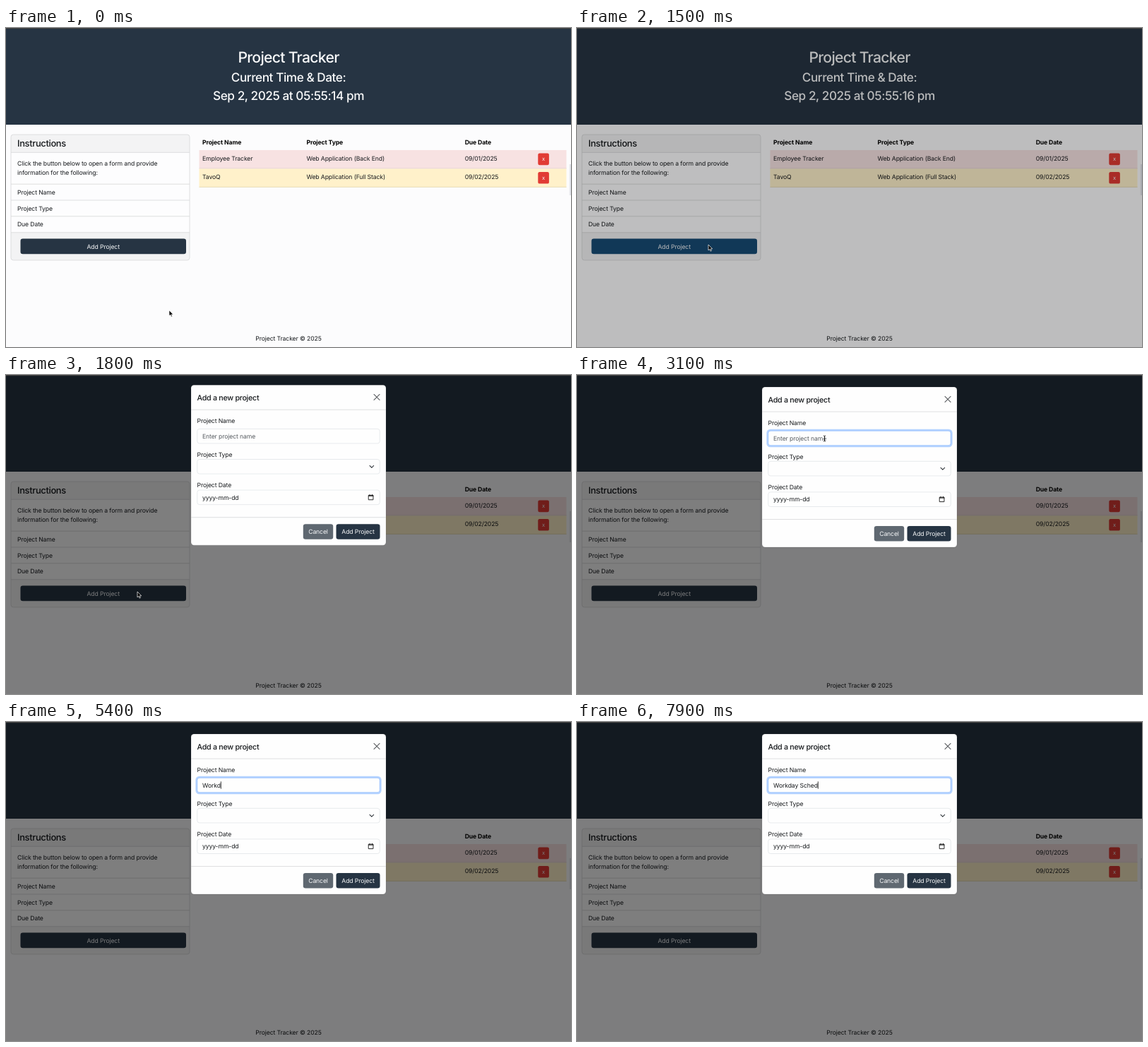
An HTML page that plays this animation: 800x452 px, repeating every 8000 ms.

```html
<!DOCTYPE html>
<html lang="en">
<head>
<meta charset="utf-8">
<title>Project Tracker</title>
<style>
  html, body { margin: 0; width: 100%; height: 100%; overflow: hidden; background: #fcfcfd; }
  svg { display: block; width: 800px; height: 452px; }
  text {
    font: 400 8.65px Inter, Roboto, sans-serif;
    font-optical-sizing: none;
    letter-spacing: -.013em;
    text-rendering: geometricPrecision;
    white-space: pre;
    fill: #16191c;
  }
  .mid { text-anchor: middle; }
  .bold { font-weight: 700; fill: #000; }
  .light, .btn { fill: #f8f9fa; }
  .h1, .h2, .h4, .h5 { font-weight: 500; letter-spacing: -.026em; }
  .h1 { font-size: 21.2px; letter-spacing: -.034em; }
  .h2 { font-size: 17.2px; }
  .h4 { font-size: 12.9px; }
  .h5 { font-size: 10.7px; }
  .hint { fill: #565b60; }
  .small { font-size: 7.6px; }
  .navy { fill: #263443; }
  .field { fill: #fefefe; stroke: #dee2e6; stroke-width: .7; }
  .line { stroke: #d6d7d9; stroke-width: .8; fill: none; }
  .icon { fill: none; stroke: #33383d; stroke-width: 1.1; stroke-linecap: round; stroke-linejoin: round; }
</style>
</head>
<body>
<svg viewBox="0 0 800 452">
  <defs>
    <linearGradient id="edge" x1="0" x2="1">
      <stop offset="0" stop-color="#b9bdcb" stop-opacity="0"/>
      <stop offset="1" stop-color="#b9bdcb" stop-opacity=".6"/>
    </linearGradient>
  </defs>

  <rect width="800" height="452" fill="#fcfcfd"/>
  <rect class="navy" width="800" height="137"/>
  <g class="mid">
    <text class="h1 light" x="400" y="49.4">Project Tracker</text>
    <text class="h2 light" x="400" y="76.2">Current Time &amp; Date:</text>
    <text class="h2 light" x="400" y="102.2" id="clock"></text>
    <text x="400" y="443">Project Tracker © 2025</text>
  </g>

  <!-- instructions card -->
  <rect x="7" y="151" width="253" height="178" rx="3.4" fill="#fdfdfe"/>
  <path d="M7 176.3V154.4Q7 151 10.4 151H256.6Q260 151 260 154.4V176.3Z" fill="#f3f3f4"/>
  <path d="M7 289.8V325.6Q7 329 10.4 329H256.6Q260 329 260 325.6V289.8Z" fill="#f3f3f4"/>
  <path class="line" d="M7 176.3H260M7 221.2H260M7 244H260M7 266.8H260M7 289.8H260"/>
  <rect class="line" x="7" y="151" width="253" height="178" rx="3.4"/>
  <text class="h4" x="16" y="168.1">Instructions</text>
  <text x="16" y="195">Click the button below to open a form and provide</text>
  <text x="16" y="208.4">information for the following:</text>
  <text x="16" y="235.6">Project Name</text>
  <text x="16" y="258.5">Project Type</text>
  <text x="16" y="281.3">Due Date</text>
  <rect id="add" x="20.5" y="298.6" width="234.5" height="21.6" rx="3.3"/>
  <text class="btn mid" x="137.7" y="312.6">Add Project</text>

  <!-- project table -->
  <text class="bold" x="278" y="165">Project Name</text>
  <text class="bold" x="425.5" y="165">Project Type</text>
  <text class="bold" x="649.7" y="165">Due Date</text>
  <g id="rows"></g>
  <rect x="797" y="193" width="3" height="44" fill="url(#edge)"/>

  <rect id="shade" width="800" height="452"/>

  <!-- dialog -->
  <g id="dialog">
    <rect x="262" y="17" width="276" height="227" rx="4.2" fill="#fefefe" stroke="#000" stroke-opacity=".2" stroke-width=".6"/>
    <path class="line" d="M262 52H538M262 204.6H538"/>
    <text class="h5" x="270.5" y="38.5">Add a new project</text>
    <path class="icon" d="M521 30.3L529 38.3M529 30.3L521 38.3" style="stroke:#5a5d60"/>
    <text x="270.5" y="71.2">Project Name</text>
    <rect id="ring" x="269.7" y="78.1" width="260.6" height="22.8" rx="4" fill="none" stroke="#0d6efd" stroke-opacity=".3" stroke-width="2.6"/>
    <rect id="name" class="field" x="270.8" y="79.2" width="258.4" height="20.6" rx="3.2"/>
    <text id="hint" class="hint" x="278" y="92.7">Enter project name</text>
    <text id="typed" x="278" y="92.7"></text>
    <rect id="caret" y="84.3" width=".8" height="10.4" fill="#111"/>
    <text x="270.5" y="118.8">Project Type</text>
    <rect class="field" x="270.8" y="122.3" width="258.4" height="20.6" rx="3.2"/>
    <path class="icon" d="M515 131.3L517.8 134.1L520.6 131.3"/>
    <text x="270.5" y="162.1">Project Date</text>
    <rect class="field" x="270.8" y="165.9" width="258.4" height="20.6" rx="3.2"/>
    <text x="278" y="179.4">yyyy-mm-dd</text>
    <path class="icon" d="M513.6 173.2H519.9V179.6H513.6ZM513.6 174.2H519.9M515 172.4V173M518.5 172.4V173" style="stroke:#111;stroke-width:.9"/>
    <rect x="420.8" y="214" width="42.4" height="21.5" rx="3.3" fill="#5f6871"/>
    <text class="btn mid" x="442" y="227.9">Cancel</text>
    <rect class="navy" x="467.5" y="214" width="62" height="21.5" rx="3.3"/>
    <text class="btn mid" x="498.5" y="227.9">Add Project</text>
  </g>

  <rect width="800" height="1.2" fill="#444342"/>

  <g id="cursor" stroke-linejoin="round">
    <path id="arrow" d="M0 0V8L1.8 6.3L3 9.2L4.4 8.6L3.2 5.9H5.7Z" fill="#000" stroke="#fff" stroke-width=".7"/>
    <path id="hand" d="M-.7 .6Q0 -.5 .7 .6V3.3Q1.5 2.6 2 3.5Q2.8 2.9 3.2 3.8Q4.4 3.6 4.3 4.8Q4.3 7 3.4 8.8H-.4Q-1.4 7 -2.9 5.4Q-2.4 4 -.7 5.4Z" fill="#fff" stroke="#000" stroke-width=".7"/>
    <g id="beam" fill="none">
      <path d="M-1.6 -4Q0 -4 0 -3V3Q0 4 -1.6 4M1.6 -4Q0 -4 0 -3V3Q0 4 1.6 4" stroke="#fff" stroke-width="1.8"/>
      <path d="M-1.6 -4Q0 -4 0 -3V3Q0 4 -1.6 4M1.6 -4Q0 -4 0 -3V3Q0 4 1.6 4M-1 .8H1" stroke="#111" stroke-width=".8"/>
    </g>
  </g>
</svg>

<script>
const LOOP = 8000, STEP = 100;
const $ = id => document.getElementById(id);
const set = (id, attrs) => {
  for (const key in attrs) $(id).setAttribute(key, attrs[key]);
};
const show = (id, on) => { $(id).style.display = on ? "" : "none"; };
const ramp = (t, start, end) => Math.min(1, Math.max(0, (t - start) / (end - start)));
const smooth = p => p * p * (3 - 2 * p);
const easeOut = p => 1 - (1 - p) ** 1.65;
const mix = (a, b, p) => a + (b - a) * p;
const blend = (a, b, p) => `rgb(${a.map((v, i) => Math.round(mix(v, b[i], p)))})`;

const rows = [
  ["Employee Tracker", "Web Application (Back End)", "09/01/2025", "#f7e2e2", "#dccbcc"],
  ["TavoQ", "Web Application (Full Stack)", "09/02/2025", "#fff1ca", "#e4d8b6"],
];
$("rows").innerHTML = rows.map(([name, type, due, fill, edge], i) => `
  <g transform="translate(0 ${i * 26.4})">
    <rect x="273.5" y="173" width="520" height="26.4" fill="${fill}"/>
    <path d="M273.5 199H793.5" stroke="${edge}" stroke-width=".8"/>
    <text x="278" y="188">${name}</text>
    <text x="425.5" y="188">${type}</text>
    <text x="649.7" y="188">${due}</text>
    <rect x="753.3" y="177.6" width="15.6" height="16.6" rx="2.2" fill="#e13b34"/>
    <text class="btn mid small" x="761.1" y="188.4">x</text>
  </g>`).join("");

// start, end, from, to
const moves = [
  [100, 1000, [231, 400], [186, 307]],
  [1850, 2400, [186, 307], [350.5, 90]],
];
const keys = [3800, 4200, 4700, 5000, 5300, 5700, 6000, 6300, 6700, 7100, 7400, 7600, 7800];
const phrase = "Workday Sched";
const CLICK = 1400, OPEN = 1575, FOCUS = 2450, BLINK = 500;
const navy = [38, 52, 67], blue = [23, 74, 116];

function pointer(t) {
  const [start, end, from, to] = t < moves[1][0] ? moves[0] : moves[1];
  const p = smooth(ramp(t, start, end));
  return from.map((v, i) => mix(v, to[i], p));
}

function draw(t) {
  const second = 14 + (t >= 300) + (t >= 1300);
  $("clock").textContent = `Sep 2, 2025 at 05:55:${second} pm`;

  // backdrop and sliding dialog
  set("shade", { opacity: 0.5 * ramp(t, OPEN - 150, OPEN) });
  set("dialog", {
    opacity: ramp(t, OPEN, OPEN + 150),
    transform: `translate(0 ${-27.8 * (1 - easeOut(ramp(t, OPEN, OPEN + 300)))})`,
  });

  // pointer and button hover
  const [x, y] = pointer(t);
  const overAdd = t <= CLICK && y < 320;
  const overName = t > OPEN && y > 79 && y < 100 && x > 271;
  set("cursor", { transform: `translate(${x} ${y})` });
  show("cursor", t < keys[0]);
  show("hand", overAdd);
  show("beam", overName);
  show("arrow", !overAdd && !overName);
  const hover = ramp(t, 700, 850) * (1 - ramp(t, 1500, 1650));
  set("add", { fill: blend(navy, blue, hover) });

  // focus, typing, caret
  const focus = ramp(t, FOCUS, FOCUS + 150);
  set("ring", { opacity: focus });
  $("name").style.stroke = blend([222, 226, 230], [134, 183, 254], focus);
  const count = keys.filter(k => k <= t).length;
  $("typed").textContent = phrase.slice(0, count);
  show("hint", !count);
  const since = t - (count ? keys[count - 1] : FOCUS);
  show("caret", since >= 0 && since % (2 * BLINK) < BLINK);
  set("caret", { x: 278 + (count ? $("typed").getComputedTextLength() : 0) });
}

function tick() {
  const t = performance.now() % LOOP;
  draw(Math.floor(t / STEP) * STEP);
  requestAnimationFrame(tick);
}
tick();
</script>
</body>
</html>
```
